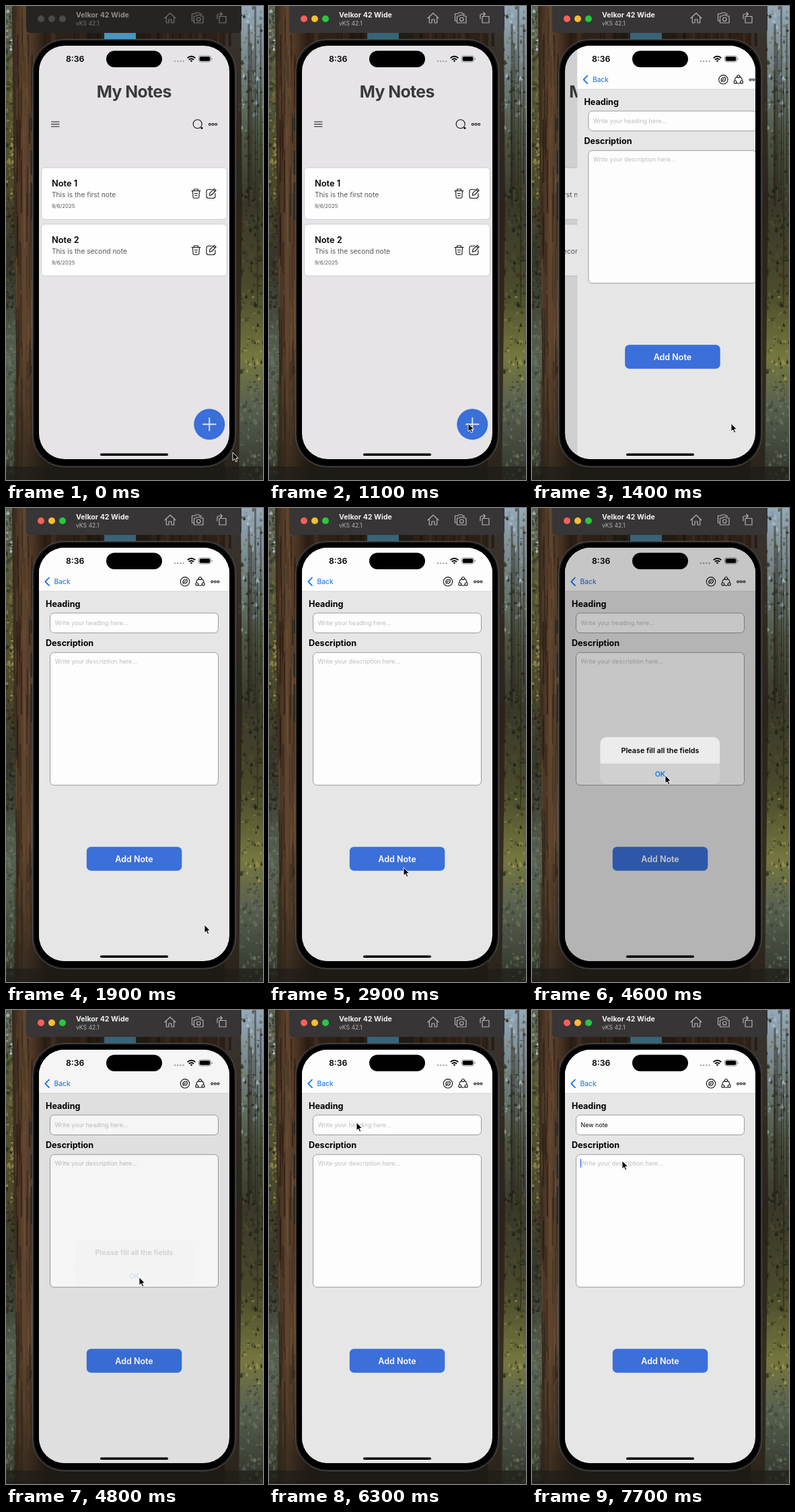
These frames come from a looping animation (382 by 704 pixels, 8000 ms). An HTML page:

```html
<!DOCTYPE html>
<html lang="en">
<head>
<meta charset="utf-8">
<title>Notes app</title>
<style>
html, body { margin: 0; width: 100%; height: 100%; overflow: hidden; background: #1d1e18; }
svg { display: block; width: 100%; height: 100%; }
text { font-family: Inter, "Liberation Sans", sans-serif; white-space: pre; }
.b { font-weight: 700; }
.sb { font-weight: 600; }
.mid { text-anchor: middle; }
.line { fill: none; stroke: #111; stroke-width: 1.1; stroke-linecap: round; stroke-linejoin: round; }
.tool { fill: none; stroke-width: 1.2; stroke-linejoin: round; stroke-linecap: round; }
.ph { font-size: 8.95px; fill: #bdbdc0; }
.field { fill: #fdfdfd; stroke: #9b9b9d; }
</style>
</head>
<body>
<svg viewBox="0 0 382 704" preserveAspectRatio="none">
<defs>
  <linearGradient id="left" x2="0" y2="1">
    <stop offset="0" stop-color="#5a6354"/><stop offset=".14" stop-color="#57583a"/>
    <stop offset=".36" stop-color="#4c4a2c"/><stop offset=".55" stop-color="#34352a"/>
    <stop offset=".76" stop-color="#5c6658"/><stop offset=".9" stop-color="#48503f"/>
    <stop offset="1" stop-color="#2c2c22"/>
  </linearGradient>
  <linearGradient id="right" x2="0" y2="1">
    <stop offset="0" stop-color="#94a9b8"/><stop offset=".12" stop-color="#77868a"/>
    <stop offset=".28" stop-color="#4c5644"/><stop offset=".42" stop-color="#39382a"/>
    <stop offset=".6" stop-color="#4a4b2c"/><stop offset=".74" stop-color="#75773f"/>
    <stop offset=".84" stop-color="#596150"/><stop offset="1" stop-color="#30342b"/>
  </linearGradient>
  <linearGradient id="bark">
    <stop offset="0" stop-color="#33251a"/><stop offset=".35" stop-color="#60462f"/>
    <stop offset=".7" stop-color="#432f20"/><stop offset="1" stop-color="#241911"/>
  </linearGradient>
  <linearGradient id="shade" x2="0" y2="1">
    <stop offset=".4" stop-color="#1d1a14" stop-opacity="0"/><stop offset="1" stop-color="#1d1a14" stop-opacity=".6"/>
  </linearGradient>
  <clipPath id="screen"><rect x="49" y="59" width="283" height="614" rx="38"/></clipPath>
  <g id="dots" class="line"><circle cx="-4.6" r="1.5"/><circle r="1.5"/><circle cx="4.6" r="1.5"/></g>
  <g id="bin" class="line">
    <path d="M-6.5-4H6.5M-3-4V-6.5H3V-4M-5-4L-4.4 5.5Q-4.3 6.8-3 6.8H3Q4.3 6.8 4.4 5.5L5-4M-2 0H2M-1.5 3H1.5"/>
  </g>
  <g id="pen" class="line">
    <path d="M1-6H-4Q-7-6-7-3V4Q-7 7-4 7H3Q6 7 6 4V0M-2.6 2.6L-2-.8 4.6-7.2 7.2-4.6 .8 2ZM3-5.6L5.6-3"/>
  </g>
</defs>

<g id="forest">
  <rect width="382" height="704" fill="#211b14"/>
  <rect width="60" height="704" fill="url(#left)"/>
  <rect x="325" width="57" height="704" fill="url(#right)"/>
  <g id="leaves"></g>
  <path d="M9 0H60V704H14Q17 480 12 300Z" fill="url(#bark)"/>
  <path d="M60 0H120V60H60ZM215 0H322V60H215Z" fill="#2d2017"/>
  <path d="M325 0H349L351 300 346 704H325Z" fill="#2b2118" opacity=".85"/>
  <g id="grain"></g>
  <path d="M12 350H60V704H12Z" fill="url(#shade)"/>
  <rect y="684" width="382" height="20" fill="#1e1d17" opacity=".65"/>
</g>
<rect id="behind" x="146" y="38" width="47" height="14"/>

<path id="bar" d="M30-1H350V34Q350 40 344 40H36Q30 40 30 34Z"/>
<g id="lights"><circle cx="52" cy="19" r="5"/><circle cx="68" cy="19" r="5"/><circle cx="84" cy="19" r="5"/></g>
<text id="device" class="b" x="104" y="17" font-size="10.6">Velkor 42 Wide</text>
<text id="system" x="104" y="28.5" font-size="8.6">vKS 42.1</text>
<g id="tools" class="tool">
  <path d="M236 18L244 10.5 252 18M238.300 16.500V25H242V20H246V25H249.700V16.500"/>
  <path d="M279 22H276.500V11.500H281L282 10H287L288 11.500H290V13M279.500 15H283L284 13.500H288.500L289.500 15H293V25H279.500Z"/>
  <circle cx="286.300" cy="19.700" r="2.700"/>
  <path d="M317 15.500H327V25H317ZM314 19V14Q314 12 316 12H321M318.800 9.500L321.300 12 318.800 14.500"/>
</g>

<g fill="#29292a">
  <rect x="36.500" y="166" width="4" height="20" rx="1"/><rect x="36.500" y="215" width="4" height="36" rx="1"/>
  <rect x="36.500" y="262" width="4" height="56" rx="1"/><rect x="340.500" y="232" width="4" height="60" rx="1"/>
</g>
<rect x="39.500" y="49.500" width="302" height="635" rx="47" fill="#1a1a1b" stroke="#555659"/>
<rect x="42" y="52" width="297" height="630.500" rx="45"/>

<g clip-path="url(#screen)">
  <g id="list">
    <rect x="49" y="59" width="283" height="614" fill="#e6e4e7"/>
    <text class="b mid" x="190.300" y="136" font-size="24.800" letter-spacing="-.6" fill="#3a3a3c">My Notes</text>
    <path class="line" d="M67.500 172H79M67.500 175.500H79M67.500 179H79"/>
    <circle class="line" cx="284.700" cy="175.300" r="6.500"/><circle cx="291" cy="181.200" r="1.500"/>
    <use href="#dots" x="307.500" y="175.700"/>
    <g id="cards"></g>
    <circle cx="302.300" cy="621.300" r="23" fill="#3b6fd9"/>
    <path d="M293 621.300H311.600M302.300 612V630.600" stroke="#dbe4f7" stroke-width="1.900" stroke-linecap="round"/>
  </g>
  <rect id="veil" x="49" y="59" width="283" height="614"/>
  <g id="form">
    <rect x="49" y="59" width="283" height="614" fill="#e5e6e5"/>
    <rect x="49" y="59" width="283" height="64.500" fill="#fdfdfd"/>
    <path d="M49 123.700H332" stroke="#d3d3d4" stroke-width=".8"/>
    <path d="M64 103.500L58.300 109.300 64 115.200" fill="none" stroke="#0a6cf0" stroke-width="1.700" stroke-linecap="round" stroke-linejoin="round"/>
    <text x="71.500" y="113.200" font-size="10.300" fill="#0a6cf0">Back</text>
    <g class="line">
      <circle cx="266" cy="109.300" r="6.700"/>
      <path d="M263.500 112.500Q261.500 108.500 265 106.500 269 105 269.500 108 269.500 111 266.500 112 264 112 264.800 109.800 266 108 267.300 108.300"/>
      <circle cx="288.500" cy="104.500" r="2"/><circle cx="283.800" cy="113" r="2"/><circle cx="293.200" cy="113" r="2"/>
      <path d="M286.300 105Q283 107 283 110.500M290.700 105Q294 107 294 110.500M285.800 114.500Q288.500 116 291.200 114.500"/>
    </g>
    <use href="#dots" x="310.800" y="109.500"/>
    <text class="b" x="59" y="146.500" font-size="12.600">Heading</text>
    <rect class="field" x="65.500" y="156" width="250" height="29.500" rx="6"/>
    <text id="hint" class="ph" x="72.500" y="174">Write your heading here...</text>
    <text id="typed" x="72.500" y="174" font-size="8.950"></text>
    <text class="b" x="59" y="205" font-size="12.600">Description</text>
    <rect class="field" x="65.500" y="214.700" width="250" height="197" rx="6"/>
    <text class="ph" x="72.500" y="230.500">Write your description here...</text>
    <rect id="caret" width="1.300" height="13" rx=".6" fill="#4264e0"/>
    <rect x="119.800" y="503.200" width="141.500" height="35.500" rx="6.500" fill="#3b6fd9"/>
    <text class="sb mid" x="190.500" y="525.500" font-size="12.500" fill="#fff">Add Note</text>
  </g>

  <text class="sb" x="89" y="83" font-size="12.300">8:36</text>
  <g fill="#a9a9ac"><circle cx="251" cy="82" r="1.300"/><circle cx="255.200" cy="82" r="1.300"/><circle cx="259.400" cy="82" r="1.300"/><circle cx="263.600" cy="82" r="1.300"/></g>
  <g fill="none" stroke="#000" stroke-width="1.900">
    <path d="M269.700 77.300Q275.500 72 281.300 77.300M271.900 79.900Q275.500 76.600 279.100 79.900"/>
  </g>
  <path d="M273.600 81.300Q275.500 79.800 277.400 81.300L275.500 83.300Z"/>
  <rect x="286.500" y="74" width="18" height="9" rx="2.800" fill="none" stroke="#77777a" stroke-width=".8"/>
  <rect x="287.700" y="75.200" width="15.600" height="6.600" rx="1.800"/>
  <path d="M305.800 77V80.200Q307 79.500 307 78.600T305.800 77Z" fill="#77777a"/>
  <rect x="140" y="664.500" width="101" height="3.400" rx="1.700"/>

  <rect id="dim" x="49" y="59" width="283" height="614"/>
  <g id="alert">
    <rect x="101.500" y="340.300" width="177.500" height="69" rx="9" fill="#ececec"/>
    <path id="press" d="M101.500 380H279V400.300Q279 409.300 270 409.300H110.500Q101.500 409.300 101.500 400.300Z" fill="#d0d0d0"/>
    <path d="M101.500 379.800H279" stroke="#c9c9ca" stroke-width=".6"/>
    <text class="sb mid" x="190.500" y="364" font-size="10.800">Please fill all the fields</text>
    <text class="sb mid" x="190.500" y="398.700" font-size="10.700" fill="#0a7aff">OK</text>
  </g>
  <rect x="149" y="66.500" width="83" height="24.500" rx="12.250"/>
</g>

<path id="cursor" d="M0 0V12L2.800 9.500 4.700 13.900 6.700 13 4.800 8.700H8.500Z" stroke="#fff" stroke-width=".9" stroke-linejoin="round"/>
</svg>

<script>
const LOOP = 8000;
const $ = id => document.getElementById(id);
const set = (id, attrs) => { for (const k in attrs) $(id).setAttribute(k, attrs[k]); };

function drawForest() {
  let seed = 7, leaves = '', grain = '';
  const rnd = () => (seed = seed * 16807 % 2147483647) / 2147483647;
  const pick = list => list[Math.floor(rnd() * list.length)];
  const sky = ['#b3c6d4', '#8199a4', '#39432c', '#262d1c', '#75713f'];
  const gold = ['#9c9350', '#6f6d36', '#3b4020', '#23281a'];
  const dark = ['#1d2017', '#2e3020', '#514a2e', '#3f3020'];
  const haze = ['#6b7560', '#3c4436', '#515a48'];
  for (let i = 0; i < 900; i++) {
    const right = i % 2, x = right ? 347 + rnd() * 36 : rnd() * 14, y = rnd() * 704;
    const tones = right
      ? (y < 190 ? sky : y < 420 ? dark : y < 565 ? gold : haze)
      : (y < 70 ? sky : y < 290 ? gold : y < 470 ? dark : haze);
    const w = 1 + rnd() * 2.5, h = 1 + rnd() * 5;
    leaves += `<path d="M${x - w} ${y}l${w} ${-h} ${w} ${h} ${-w} ${h / 2}z" fill="${pick(tones)}" opacity="${.4 + rnd() * .5}"/>`;
  }
  // Bark streaks, then slim far trunks on the right
  const streak = (x, y, w, h, fill) => `<rect x="${x}" y="${y}" width="${w}" height="${h}" fill="${fill}" opacity=".45"/>`;
  for (let i = 0; i < 90; i++)
    grain += streak(13 + rnd() * 26, rnd() * 640, .8 + rnd() * 1.6, 20 + rnd() * 80, pick(['#1f150e', '#2b1d13', '#7a5a3c']));
  for (let i = 0; i < 7; i++)
    grain += streak(350 + rnd() * 32, rnd() * 120, 1 + rnd() * 2.5, 180 + rnd() * 220, '#241d15');
  for (let i = 0; i < 40; i++)
    grain += streak(45 + rnd() * 290, 40, 1 + rnd() * 4, 20, pick(['#17110c', '#4a3424']));
  $('leaves').innerHTML = leaves;
  $('grain').innerHTML = grain;
}

const card = (y, title, body) => `
  <rect x="52.500" y="${y}" width="276" height="77" rx="5.500" fill="#fefefe" stroke="#cbcbcf"/>
  <text class="sb" x="68" y="${y + 28.3}" font-size="12.800">${title}</text>
  <text x="68" y="${y + 44}" font-size="10.200" fill="#58585a">${body}</text>
  <text x="68" y="${y + 59.5}" font-size="7.800" fill="#58585a">9/6/2025</text>
  <use href="#bin" x="282.500" y="${y + 38.5}"/><use href="#pen" x="305" y="${y + 38.5}"/>`;

// Critically damped spring, 0 to 1
const spring = (ms, w) => {
  const x = Math.max(0, ms) / 1000 * w;
  return 1 - (1 + x) * Math.exp(-x);
};

// time, x, y
const route = [
  [0, 337, 663], [950, 296, 620], [1850, 296, 620], [2700, 200, 534], [3050, 200, 534],
  [3400, 201.5, 521.5], [3650, 201.5, 521.5], [4400, 198, 397], [4850, 198, 397],
  [5400, 130, 167], [7080, 130, 167], [7400, 134, 224], [LOOP, 134, 224]
];
function cursorAt(t) {
  const i = route.findIndex(p => p[0] > t), [t0, x0, y0] = route[i - 1], [t1, x1, y1] = route[i];
  const u = (t - t0) / (t1 - t0), e = u * u * (3 - 2 * u);
  return [x0 + (x1 - x0) * e, y0 + (y1 - y0) * e];
}

const TEXT = 'New note';
const keys = [6690, 6790, 6870, 6890, 7090, 7110, 7190, 7290];
const lit = ['#ff5f57', '#febc2e', '#28c840'];

function drawBar(on) {
  set('bar', { fill: on ? '#373536' : '#262422' });
  set('device', { fill: on ? '#f1f0f1' : '#8f8d8b' });
  set('system', { fill: on ? '#b7b4b7' : '#777573' });
  set('tools', { stroke: on ? '#b3b0b3' : '#74726f' });
  set('behind', { fill: on ? '#386478' : '#4a96c0' });
  [...$('lights').children].forEach((c, i) => c.setAttribute('fill', on ? lit[i] : '#4c4a48'));
}

function drawCaret(t, width) {
  const inBody = t >= 7560;
  const blinkOff = t >= 6050 && t < 6350;
  set('caret', {
    x: inBody ? 71.8 : 72 + width,
    y: inBody ? 221 : 164.5,
    opacity: t < 5700 || blinkOff ? 0 : 1
  });
}

function draw(t) {
  drawBar(t >= 1000);

  const push = spring(t - 1100, 14.7);
  set('list', { transform: `translate(${-85 * push})` });
  set('veil', { opacity: .1 * push });
  set('form', { transform: `translate(${283 * (1 - push)})` });

  const shown = spring(t - 3500, 20), gone = spring(t - 4640, 21);
  const alpha = shown * (1 - gone), scale = 1 + .22 * (1 - shown);
  set('dim', { opacity: .22 * alpha });
  set('alert', {
    opacity: alpha,
    transform: `translate(190.25 374.8) scale(${scale}) translate(-190.25 -374.8)`
  });
  set('press', { opacity: t >= 4500 && t < 4640 ? 1 : 0 });

  const count = keys.filter(k => t >= k).length;
  $('typed').textContent = TEXT.slice(0, count);
  set('hint', { opacity: count ? 0 : 1 });
  drawCaret(t, count ? $('typed').getComputedTextLength() : 0);

  set('cursor', { transform: `translate(${cursorAt(t)})` });
}

function tick() {
  draw(performance.now() % LOOP);
  requestAnimationFrame(tick);
}

drawForest();
$('cards').innerHTML = card(240, 'Note 1', 'This is the first note') + card(324, 'Note 2', 'This is the second note');
tick();
</script>
</body>
</html>
```
